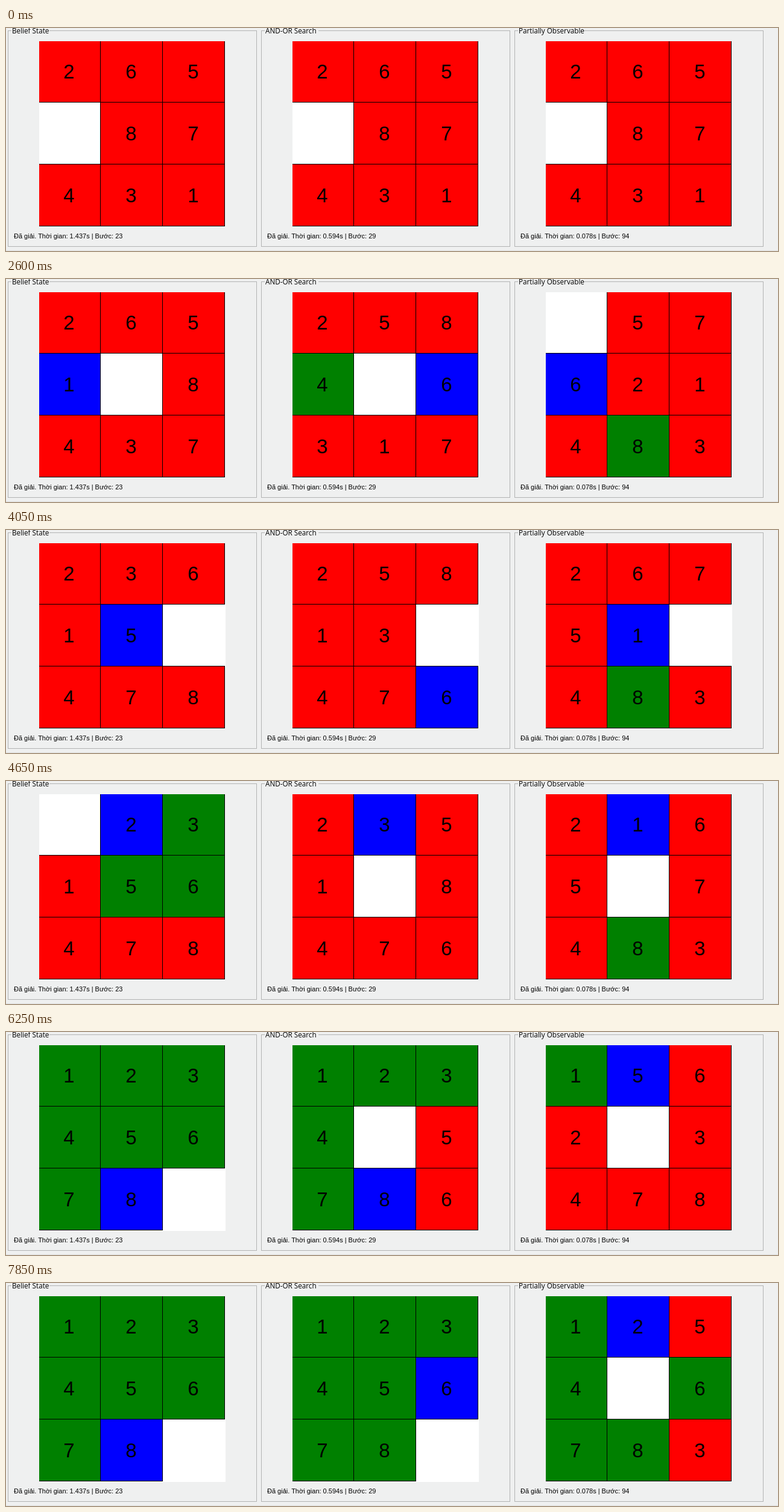
Recreate the animation shown at these times as an HTML page. Size 1280x371 px, loop 8 s.

```html
<!DOCTYPE html>
<html lang="vi">
<head>
<meta charset="utf-8">
<title>8-puzzle</title>
<style>
  html, body { margin: 0; width: 100%; height: 100%; overflow: hidden; background: #eff0f0; }
  svg { display: block; width: 1280px; height: 371px; }
  .group { fill: none; stroke: #b2b3b3; }
  .gap { fill: #eff0f0; }
  .title { font: 11.7px "Open Sans", sans-serif; }
  .status { font: 11px "Liberation Sans", Arial, sans-serif; }
  .digit { font: 33px "Liberation Sans", Arial, sans-serif; text-anchor: middle; }
  .tile { stroke: #000; stroke-width: 1; }
</style>
</head>
<body>
<svg id="stage" viewBox="0 0 1280 371">
  <clipPath id="board"><rect x="55" y="22" width="309" height="309"/></clipPath>
  <rect y="370" width="1280" height="1" fill="#e0e1e1"/>
</svg>
<script>
const LOOP = 8000, CELL = 103, START = '2650' + '' ;
const FIRST = '265087431', GOAL = '123456780';
const SHIFT = { U: -3, D: 3, L: -1, R: 1 };

// Each path lists the moves of the empty cell.
const PANELS = [
  { title: 'Belief State', gap: 63, time: '1.437', steps: 23,
    path: 'DRRU LDLUR DRUU LDRULL DDRR' },
  { title: 'AND-OR Search', gap: 89, time: '0.594', steps: 29,
    path: 'DRRU LURDL DLUR DRUULD RULLDDRU RD' },
  { title: 'Partially Observable', gap: 109, time: '0.078', steps: 94,
    path: 'URRD DLULU RDLU RDRULD RDLULURD LDRRUULD' }
];

const TIMES = [1000, 1200, 1400, 1600, 1790, 1990, 2200, 2400, 2600, 2800,
  3000, 3190, 3390, 3590, 3790, 4050];
for (let t = 4250; t < LOOP; t += 200) TIMES.push(t);

function add(parent, tag, attrs, text = '') {
  const el = document.createElementNS('http://www.w3.org/2000/svg', tag);
  for (const name in attrs) el.setAttribute(name, attrs[name]);
  el.textContent = text;
  return parent.appendChild(el);
}

function solve(path) {
  const states = [{ cells: FIRST, moved: -1 }];
  let cells = [...FIRST];
  for (const move of path.replace(/ /g, '')) {
    const from = cells.indexOf('0'), to = from + SHIFT[move];
    cells = [...cells];
    [cells[from], cells[to]] = [cells[to], '0'];
    states.push({ cells: cells.join(''), moved: from });
  }
  return states;
}

function buildPanel({ title, gap, time, steps, path }, index) {
  const panel = add(stage, 'g', { transform: `translate(${index * 420} 0)` });
  add(panel, 'rect', { class: 'group', x: 3.5, y: 4.5, width: 412, height: 359 });
  add(panel, 'rect', { class: 'gap', x: 9, y: 0, width: gap, height: 10 });
  add(panel, 'text', { class: 'title', x: 10, y: 9 }, title);
  add(panel, 'text', { class: 'status', x: 13, y: 350 },
    `Đã giải. Thời gian: ${time}s | Bước: ${steps}`);

  const board = add(panel, 'g', { 'clip-path': 'url(#board)' });
  const blank = add(board, 'rect', { fill: '#fff', width: CELL + 2, height: CELL + 2 });
  const tiles = [...GOAL].map((_, i) => {
    const x = 53.5 + i % 3 * CELL, y = 20.5 + Math.floor(i / 3) * CELL;
    const group = add(board, 'g', {});
    const face = add(group, 'rect', { class: 'tile', x, y, width: CELL, height: CELL });
    const digit = add(group, 'text', { class: 'digit', x: x + 51, y: y + 63 });
    return { x, y, group, face, digit };
  });
  return { blank, tiles, states: solve(path) };
}

function showState({ blank, tiles, states }, step) {
  const { cells, moved } = states[Math.min(step, states.length - 1)];
  tiles.forEach(({ x, y, group, face, digit }, i) => {
    const empty = cells[i] === '0';
    group.style.display = empty ? 'none' : '';
    if (empty) {
      blank.setAttribute('x', x);
      blank.setAttribute('y', y);
    }
    face.setAttribute('fill', i === moved ? '#00f' : cells[i] === GOAL[i] ? '#008000' : '#f00');
    digit.textContent = cells[i];
  });
}

const stage = document.getElementById('stage');
const panels = PANELS.map(buildPanel);
const origin = performance.now();
let shown = -1;

function tick() {
  const now = (performance.now() - origin) % LOOP;
  const step = TIMES.filter(t => t <= now).length;
  if (step !== shown) {
    panels.forEach(panel => showState(panel, step));
    shown = step;
  }
  requestAnimationFrame(tick);
}
tick();
</script>
</body>
</html>
```
